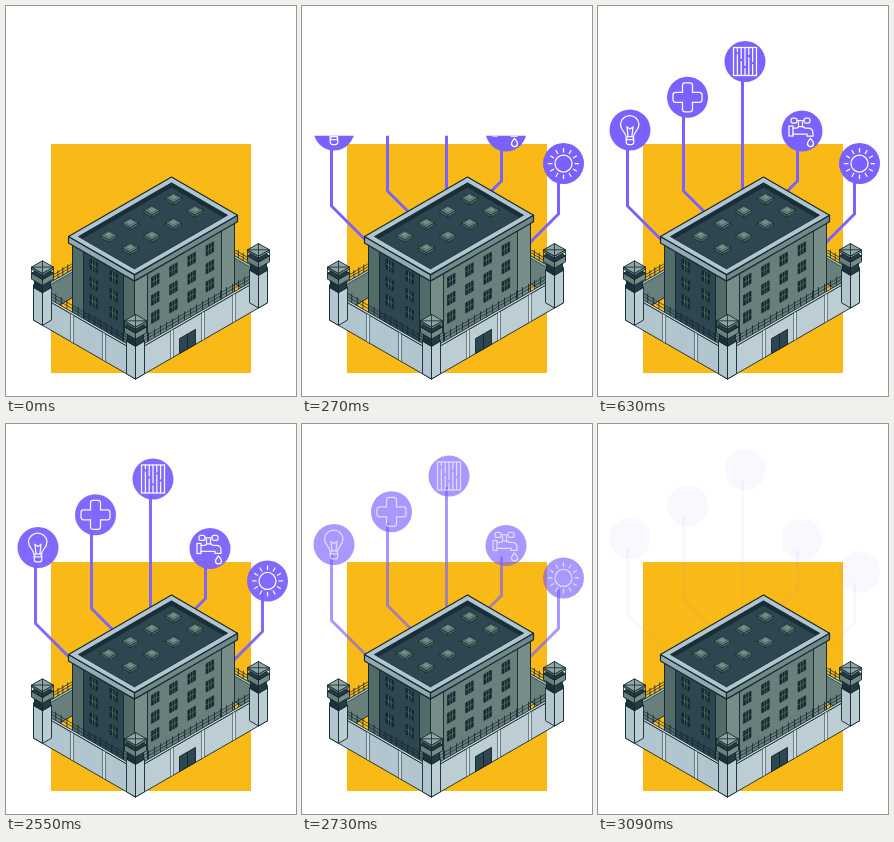
An HTML page for the animation above (3150 ms loop, 290 by 390 pixels).

```html
<!DOCTYPE html>
<html lang="en">
<head>
<meta charset="utf-8">
<title>Building services</title>
<style>
  html, body { margin: 0; width: 100%; height: 100%; overflow: hidden; background: #fff; }
  svg { display: block; width: 100%; height: 100%; }
</style>
</head>
<body>
<svg id="stage" viewBox="0 0 290 390"></svg>
<script>
const INK = '#14282f', NAVY = '#2d4650', SAGE = '#687f7b', SAGE_DARK = '#526b69', SAGE_LIGHT = '#768d88',
      PALE = '#b0c5cd', PALE_LIGHT = '#bccdd4', GLASS = '#8fa5a3', PURPLE = '#7b61ff';

// Isometric space: u runs to the right, v to the left, z up, all from the front corner of the site.
const RISE = Math.tan(Math.PI / 6);
const iso = (u, v, z = 0) => [129.5 + u - v, 373 - (u + v) * RISE - z];

const repeat = (n, draw) => Array.from({ length: n }, (_, i) => draw(i)).join('');
const poly = (points, fill, line = 0.9) =>
  `<polygon points="${points}" fill="${fill}" stroke="${INK}" stroke-width="${line}" stroke-linejoin="round"/>`;
const segment = (a, b, color = INK, width = 0.8) =>
  `<path d="M${a}L${b}" stroke="${color}" stroke-width="${width}"/>`;

// Faces: flat ones, those looking left (constant u) and those looking right (constant v).
const flat = (u, v, z, du, dv, fill, line) =>
  poly([iso(u, v, z), iso(u + du, v, z), iso(u + du, v + dv, z), iso(u, v + dv, z)], fill, line);
const leftFace = (u, v, z, dv, dz, fill, line) =>
  poly([iso(u, v, z), iso(u, v + dv, z), iso(u, v + dv, z + dz), iso(u, v, z + dz)], fill, line);
const rightFace = (u, v, z, du, dz, fill, line) =>
  poly([iso(u, v, z), iso(u + du, v, z), iso(u + du, v, z + dz), iso(u, v, z + dz)], fill, line);
const box = (u, v, z, du, dv, dz, top, left, right, line) =>
  leftFace(u, v, z, dv, dz, left, line) + rightFace(u, v, z, du, dz, right, line) +
  flat(u, v, z + dz, du, dv, top, line);

const site = { u: 132, v: 102, wall: 28 };
const block = { u: 20, v: 21, du: 100, dv: 62, top: 76.5 };
const POST = 9;

function fence(u, v, du, dv, posts, height) {
  const at = (f, z) => iso(u + du * f, v + dv * f, site.wall + z);
  const rail = z => segment(at(0, z), at(1, z), INK, 0.7);
  return rail(height * 0.4) + rail(height * 0.75) +
    repeat(posts, i => segment(at(i / (posts - 1), 0), at(i / (posts - 1), height)));
}

function barredWindow(face, point) {
  const w = 7.5, h = 10;
  return face(w, h) +
    repeat(2, i => segment(point(w * (i + 1) / 3, 0), point(w * (i + 1) / 3, h), SAGE, 0.6)) +
    segment(point(0, h / 2), point(w, h / 2), SAGE, 0.6);
}

function blockWalls() {
  const { u, v, du, dv, top } = block;
  const pillar = 11;
  const leftWindow = (dv, z) => barredWindow(
    (w, h) => leftFace(u, v + dv, z, w, h, INK, 0.7), (s, dz) => iso(u, v + dv + s, z + dz));
  const rightWindow = (du, z) => barredWindow(
    (w, h) => rightFace(u + du, v, z, w, h, INK, 0.7), (s, dz) => iso(u + du + s, v, z + dz));
  return leftFace(u, v, 0, dv, top, NAVY) + rightFace(u, v, 0, du, top, SAGE) +
    [0, dv - pillar].map(s => leftFace(u, v + s, 0, pillar, top, SAGE_DARK)).join('') +
    [0, du - pillar - 2].map(s => rightFace(u + s, v, 0, pillar + 2, top, SAGE_LIGHT)).join('') +
    repeat(3, row =>
      repeat(2, col => leftWindow(17 + 20 * col, 61 - 18 * row)) +
      repeat(4, col => rightWindow(17 + 18.2 * col, 58 - 18 * row)));
}

function roof() {
  const u = block.u - 2, v = block.v - 2, du = block.du + 3, dv = block.dv + 4;
  const z = block.top + 6.5, rim = 5, shade = 4;
  const skylight = (u, v) => box(u, v, z - 2.5, 8, 8, 2.5, SAGE, '#4c6463', SAGE_DARK, 0.7) +
    flat(u + 2, v + 2, z, 5, 5, SAGE_LIGHT, 0.3);
  return box(u, v, block.top, du, dv, 6.5, PALE, '#93a9b0', '#71888a', 1.2) +
    flat(u + rim, v + rim, z, du - 2 * rim, dv - 2 * rim, '#192e37') +
    flat(u + rim, v + rim, z, du - 2 * rim - shade, dv - 2 * rim - shade, NAVY, 0) +
    repeat(4, i => repeat(2, j => skylight(100 - 21.6 * i, 62 - 21.6 * j)));
}

function backWalls() {
  const { u, v, wall } = site;
  return rightFace(0, v, 0, u, wall, SAGE) + leftFace(u, 0, 0, v, wall, SAGE) +
    flat(0, v - 2, wall, u, 2, PALE, 0.7) + flat(u - 2, 0, wall, 2, v, PALE, 0.7) +
    fence(0, v, u, 0, 28, 8) + fence(u, 0, 0, v, 22, 8);
}

function frontWalls() {
  const { u, v, wall } = site;
  return fence(2, POST, 0, v - 2 * POST, 16, 9) + fence(POST, 2, u - 2 * POST, 0, 20, 9) +
    box(0, 0, 0, 2, v, wall, '#d3dfe3', PALE, PALE) +
    box(0, 0, 0, u, 2, wall, '#d3dfe3', PALE, PALE_LIGHT) +
    repeat(2, i => leftFace(0, 30 + 32 * i, 0, 3, wall, '#cad8dd', 0.5)) +
    repeat(3, i => rightFace(35 + 31 * i, 0, 0, 3, wall, '#cfdce0', 0.5)) +
    repeat(2, i => rightFace(44 + 8 * i, 0, 0, 8, 15, NAVY));
}

function tower(u, v) {
  const centred = (size, z, dz, ...fills) =>
    box(u + (POST - size) / 2, v + (POST - size) / 2, z, size, size, dz, ...fills);
  const cab = 11, near = (POST - cab) / 2, far = near + cab;
  const corner = (a, b, z) => iso(u + a, v + b, z);
  return box(u, v, 0, POST, POST, 33, PALE, PALE, PALE_LIGHT) +
    centred(8, 32, 9, INK, '#1b3038', '#243b43') +
    centred(cab, 41, 6, '#243b43', SAGE, SAGE_LIGHT) +
    [[near, near], [near, far], [far, near]].map(([a, b]) =>
      segment(corner(a, b, 47), corner(a, b, 53))).join('') +
    centred(cab, 51, 2, GLASS, SAGE, GLASS) +
    segment(corner(near, near, 53), corner(far, far, 53)) +
    segment(corner(near, far, 53), corner(far, near, 53));
}

// Icons are line drawings centred on their callout.
const line = d => `<path d="${d}"/>`;
const circle = (r, x = 0, y = 0) => `<circle cx="${x}" cy="${y}" r="${r}"/>`;
const rect = (w, h, x = 0, y = 0, r = 0) =>
  `<rect x="${x - w / 2}" y="${y - h / 2}" width="${w}" height="${h}" rx="${r}"/>`;
const turned = (n, body) => repeat(n, i => `<g transform="rotate(${360 / n * i})">${body}</g>`);

const bulb = line('M-4 7C-4 2-9.5 1-9.5-6A9.3 9.3 0 0 1 9-6C9 1 3.5 2 3.5 7M-2 6L-3-3 0-1 3-3 2 6') +
  rect(7.5, 8, 0, 10.5, 2.5) + line('M-4 9.5h7.5');
const cross = turned(4, line('M-5-5V-12Q-5-14.5-2.5-14.5H2.5Q5-14.5 5-12V-5'));
const bars = rect(23, 28) + repeat(5, i => {
  const x = -7.6 + 3.8 * i, gap = -10 + i * 7 % 18;
  return line(`M${x}-14V${gap}M${x} ${gap + 3}V14`);
});
const faucet = rect(6, 5, -8, -10.5, 2) + rect(6, 5, 5, -10.5, 2) + rect(4, 10, -11) +
  line('M-5-10.5H2M-3.5-9V-4M.5-9V-4M-9-3H-5L-3-4.5H1L3-3H6Q11-3 11 2V5H5V3H-9') +
  line('M8.5 7.5Q5.5 11 5.5 12.5A3 3 0 0 0 11.5 12.5Q11.5 11 8.5 7.5');
const sun = circle(8.5) + turned(12, line('M0-11.5V-15'));

// Each stem drops from its icon at stemX to bend, then runs diagonally (dir) behind the building.
const callouts = [
  { icon: bulb,   x: 32,    y: 124,   stemX: 29.5,  bend: 200, dir: 1 },
  { icon: cross,  x: 89.5,  y: 91.3,  stemX: 85.5,  bend: 185, dir: 1 },
  { icon: bars,   x: 147,   y: 55.5,  stemX: 144.5, bend: 185, dir: 0 },
  { icon: faucet, x: 204,   y: 125,   stemX: 199.5, bend: 175, dir: -1 },
  { icon: sun,    x: 261.5, y: 157.5, stemX: 256.5, bend: 208, dir: -1 },
];
const stem = ({ y, stemX, bend, dir }) =>
  `<path class="fade" d="M${stemX} ${y + 11}V${bend}l${35 * dir} 35" fill="none" stroke="${PURPLE}" stroke-width="3"/>`;
const badge = ({ icon, x, y }) => `<g transform="translate(${x} ${y})">
  <circle class="fade" r="20.5" fill="${PURPLE}"/>
  <g class="fade" fill="none" stroke="#fff" stroke-width="1.25" stroke-linecap="round">${icon}</g></g>`;

const stage = document.getElementById('stage');
stage.innerHTML = `
  <clipPath id="wipe"><rect id="window" width="290" height="390"/></clipPath>
  <rect x="45" y="138" width="200" height="229" fill="#f9ba18"/>
  <g clip-path="url(#wipe)"><g id="callouts">
    ${callouts.map(stem).join('')}${callouts.map(badge).join('')}
  </g></g>
  ${backWalls()}${blockWalls()}${roof()}${frontWalls()}
  ${tower(0, site.v - POST)}${tower(site.u - POST, 0)}${tower(0, 0)}`;

const reveal = document.getElementById('window');
const group = document.getElementById('callouts');
const faders = stage.querySelectorAll('.fade');
const LOOP = 3150;

function render(t) {
  const top = t < 800 ? 21.4 + 0.000387 * (800 - t) ** 2 : 0;
  const exit = Math.min(1, Math.max(0, (t - 2520) / 600));
  reveal.setAttribute('y', top);
  group.setAttribute('transform', `translate(0 ${-10 * exit})`);
  faders.forEach(el => el.setAttribute('opacity', 1 - exit));
}

const start = performance.now();
function tick() {
  render((performance.now() - start) % LOOP);
  requestAnimationFrame(tick);
}
tick();
</script>
</body>
</html>
```
